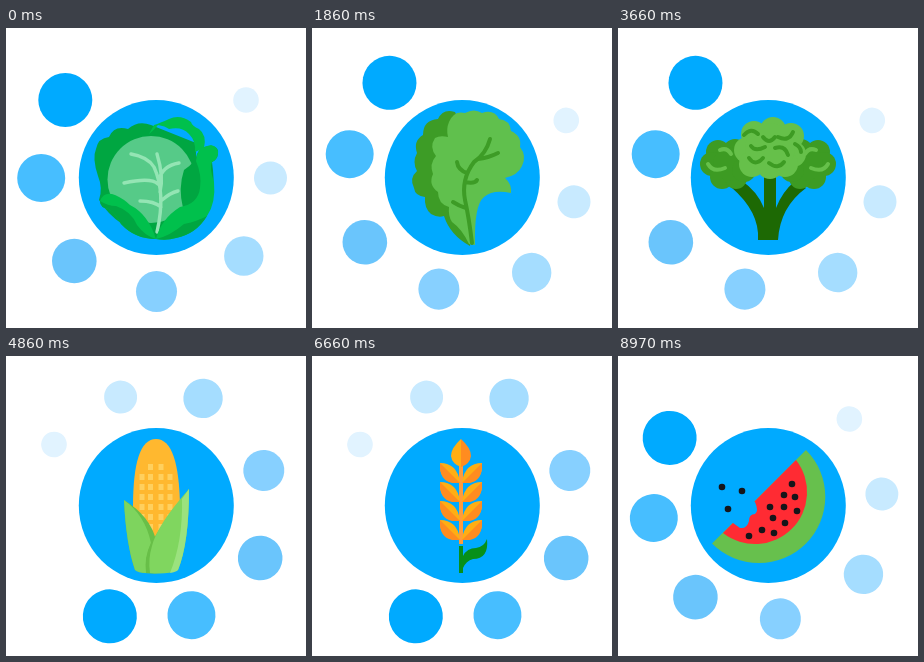
An HTML page that plays this animation: 300 by 300 pixels, repeating every 9000 ms.

```html
<!DOCTYPE html>
<html lang="en">
<head>
<meta charset="utf-8">
<title>Vegetable loader</title>
<style>
  html, body { margin: 0; width: 100%; height: 100%; overflow: hidden; background: #fff; }
  svg { display: block; width: 100vw; height: 100vh; }
</style>
</head>
<body>
<svg id="stage" viewBox="0 0 300 300"></svg>
<script>
const LOOP = 9000, TURN = 1800, STEP = 30;
const BLUE = '#00aaff';

const shape = (fill, d) => `<path fill="${fill}" d="${d}"/>`;
const line = (color, width, d, extra = '') =>
  `<path fill="none" stroke="${color}" stroke-width="${width}" stroke-linecap="round" stroke-linejoin="round" d="${d}" ${extra}/>`;
const dot = (fill, x, y, r) => `<circle cx="${x}" cy="${y}" r="${r}" fill="${fill}"/>`;
const dots = (fill, list, r) => list.map(([x, y, own]) => dot(fill, x, y, own || r)).join('');
const mirror = (axis, art) => `<g transform="matrix(-1 0 0 1 ${2 * axis} 0)">${art}</g>`;

function cabbage() {
  const dark = '#00a641', light = '#00c04c';
  return shape(dark, 'M93 172Q97 160 92 148Q86 130 90 121Q92 110 103 109Q108 97 122 101Q132 92 145 97L190 115V178L150 211Q110 200 93 172Z')
    + shape(light, 'M143 106Q148 102 152 97Q159 98 163 101Q176 98 183 106Q190 113 189 124L198 120Q201 107 193 101Q186 98 185 94Q174 86 163 91Q154 95 148 97Z')
    + dot('#56ca88', 145, 151.5, 43.5)
    + line('#94e5b4', 3.4, 'M151 204Q160 165 148 139Q142 129 125 126M152 156Q145 149 118 155M153 152Q156 138 173 135M154 164Q158 149 151 126M155 179Q148 173 134 173M156 172Q164 165 172 163')
    + shape(dark, 'M177 180Q172 160 178 142Q190 134 191 126Q197 117 206 118Q213 119 212 126Q211 132 206 134Q211 168 200 182Z')
    + shape(light, 'M191 127Q192 119 205 117Q213 119 212 126Q211 132 206 134Q203 139 208 154Q210 175 201 188Q190 206 170 210Q160 213 150 211Q155 191 174 179Q192 176 194 160Q196 147 190 133Z')
    + shape(dark, 'M150 211Q164 208 178 196Q192 193 201 188Q190 206 170 210Q160 213 150 211Z')
    + shape(light, 'M94 173Q98 163 109 167Q118 171 124 177Q142 186 150 211Q129 211 115 196Q110 186 103 181Q94 180 94 173Z')
    + shape(dark, 'M94 173Q102 178 110 178Q125 183 131 197Q139 208 150 211Q129 211 115 196Q110 186 103 181Q94 180 94 173Z');
}

function lettuce() {
  const dark = '#3d9c26', light = '#60c04d';
  return shape(dark, 'M143 84Q131 80 126 91Q111 92 111 107Q101 113 105 125Q100 134 105 143Q97 150 102 160Q103 168 113 169Q112 180 119 186Q126 190 132 188Q138 207 158 218L162 180L150 100Z')
    + shape(light, 'M137 94Q142 82 153 85Q162 80 170 85Q182 81 187 91Q198 92 199 103Q210 108 208 119Q215 128 210 138Q206 147 193 150Q200 156 199 165Q181 161 172 169Q162 177 163 217L157 216Q150 201 140 194Q136 188 137 179Q126 176 126 164Q116 157 121 146Q117 136 124 128Q117 119 123 110Q128 107 136 109Q134 101 137 94Z')
    + line(dark, 4, 'M160 215Q157 190 153 172Q149 151 162 134Q174 126 178 111M166 131Q176 130 186 125M153 154Q163 156 165 152M155 145Q146 142 145 134M154 180Q147 178 141 174');
}

function broccoli() {
  const dark = '#3d9b23', light = '#66c04a';
  const side = dots(dark, [[100, 124], [94, 136], [117, 123], [104, 149], [118, 150, 11], [112, 136, 17], [126, 142]], 12)
    + line(light, 4, 'M90 136Q95 145 107 140M102 122Q109 119 113 126');
  return shape('#1d6904', 'M140 212Q142 184 113 159L124 153Q139 163 146 180V146H158V180Q164 164 177 153L188 160Q162 179 160 212Z')
    + side + mirror(150, side)
    + dots(light, [[155, 102], [136, 106], [173, 108], [129, 122], [175, 126], [134, 136], [152, 138], [167, 136], [152, 120, 25]], 13)
    + line(dark, 4, 'M126 107Q133 99 140 106M145 109Q151 117 157 109M160 109Q171 114 175 104M133 118Q137 124 147 119M157 120Q167 117 170 127M131 130Q137 139 145 130M151 135Q160 142 166 134M177 116Q183 119 183 124');
}

function corn() {
  return shape('#ffb82f', 'M127 151Q127 83 150 83Q173 83 174 151L169 190H132Z')
    + line('#ffd05e', 5, 'M136 118V176M144.5 108V186M155 108V186M164 118V176', 'stroke-dasharray="6 4" style="stroke-linecap:butt"')
    + shape('#68bf48', 'M118 144Q144 160 150 184L153 217Q139 219 129 214Q120 188 118 144Z')
    + shape('#7ed45e', 'M118 144Q139 159 145 187Q138 201 140 217Q132 217 129 214Q120 188 118 144Z')
    + shape('#68bf48', 'M183 133Q161 160 145 187Q138 203 141 217H153L176 165Z')
    + shape('#80d65f', 'M183 133Q151 169 146 190Q142 203 144 217Q161 219 172 214Q183 187 183 133Z')
    + shape('#9be27e', 'M183 133L176 143Q177 185 164 217Q170 216 172 214Q183 187 183 133Z');
}

function wheat() {
  const gold = '#ffae13', orange = '#ff8c20';
  const grain = shape(gold, 'M128 107Q145 107 148 126H141Q127 124 128 107Z')
    + shape(orange, 'M128 107L148 127H140Q127 124 128 107Z');
  let art = line('#ff9b3c', 4, 'M149 110V188', 'style="stroke-linecap:butt"');
  for (let i = 0; i < 4; i++)
    art += `<g transform="translate(0 ${i * 19})">${grain}${mirror(149, grain)}</g>`;
  return art
    + shape(gold, 'M149 83Q139 92 139 100Q140 108 149 111Z')
    + shape(orange, 'M149 83Q159 92 159 100Q158 108 149 111Z')
    + shape('#079019', 'M147 190H151V200Q155 192 164 192Q172 191 175 183Q177 203 161 203Q154 205 151 212V217H147Z');
}

function avocado() {
  return line('#6d2930', 4, 'M181 108Q191 95 202 102')
    + '<path fill="#ffeb80" stroke="#216c05" stroke-width="10" d="M168 106Q180 104 182 117Q181 127 176 141Q168 165 160 180Q146 204 122 204Q100 201 100 177Q102 153 128 135Q144 125 153 115Q160 107 168 106Z"/>'
    + shape('#b96c36', 'M150 146Q156 162 144 178Q131 192 120 185Q110 175 120 159Q135 143 150 146Z')
    + dots('#ff9a1a', [[131, 166], [123, 173], [132, 178]], 3.3);
}

function watermelon() {
  return shape('#67c04d', 'M188 94A66 66 0 0 1 94 187.5Z')
    + shape('#ff2b33', 'M178 104A52 52 0 0 1 105 177Z')
    + shape(BLUE, 'M128 138L137 146Q141 155 137 158Q131 158 131 165Q129 173 122 172L115 167L105 160Z')
    + dots('#15151a', [[174, 128], [166, 139], [177, 141], [152, 151], [166, 151], [179, 155], [155, 162],
      [167, 167], [144, 174], [156, 177], [131, 180], [104, 131], [124, 135], [110, 153]], 3.3);
}

const icons = [
  [0, cabbage], [1200, lettuce], [3000, broccoli], [4800, corn],
  [6000, wheat], [7200, avocado], [8400, watermelon]
];

const ring = dot(BLUE, 59.3, 72, 27) + dot('#47beff', 35.2, 150, 24)
  + dot('#6ac5fc', 68.3, 233, 22.3) + dot('#87d0ff', 150.5, 263.5, 20.5)
  + dot('#a5ddff', 237.8, 228, 19.7) + dot('#c8eaff', 264.5, 150, 16.5)
  + dot('#e1f3ff', 240, 72, 12.8);

const stage = document.getElementById('stage');
stage.innerHTML = `<g id="ring">${ring}</g>` + dot(BLUE, 150.3, 149.6, 77.5)
  + icons.map(([, draw]) => `<g class="icon">${draw()}</g>`).join('');
const ringNode = document.getElementById('ring');
const iconNodes = [...document.querySelectorAll('.icon')];
const start = performance.now();

function render(now) {
  const t = Math.floor(Math.max(0, now - start) % LOOP / STEP) * STEP;
  ringNode.setAttribute('transform', `rotate(${t / TURN * 360 % 360} 150 150)`);
  const current = icons.filter(([from]) => from <= t).length - 1;
  iconNodes.forEach((node, i) => node.style.display = i === current ? '' : 'none');
  requestAnimationFrame(render);
}
render(start);
</script>
</body>
</html>
```
